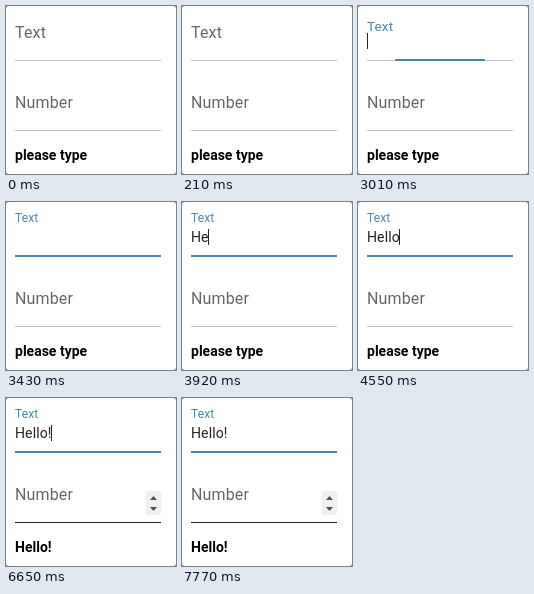
These frames come from a looping animation (170 px wide and 168 px high, 8000 ms). An HTML page with a canvas:

```html
<!DOCTYPE html>
<html lang="en">
<head>
<meta charset="utf-8">
<title>Form fields</title>
<style>
  html, body { margin: 0; width: 100%; height: 100%; overflow: hidden; background: #fff; }
  body { position: relative; font-family: Roboto, sans-serif; -webkit-font-smoothing: antialiased; }
  canvas { position: absolute; left: 0; top: 0; }
  .text { position: absolute; left: 9px; white-space: pre; letter-spacing: .00937em; }
  .label { font-size: 16px; line-height: 20px; color: rgba(0, 0, 0, .6); transform-origin: 0 0; }
  #typed { top: 23px; font-size: 14px; line-height: 24px; color: rgba(0, 0, 0, .87); }
  #result { top: 139px; font-size: 14px; line-height: 21px; font-weight: 700; letter-spacing: 0; color: #000; }
</style>
</head>
<body>
<canvas id="stage" width="170" height="168"></canvas>
<div class="text label" id="label" style="top:17px">Text</div>
<div class="text" id="typed"></div>
<div class="text label" style="top:87px">Number</div>
<div class="text" id="result">please type</div>
<script>
const LOOP = 8000, TICK = 70;
const FOCUS = 2850, FOCUS_TIME = 400;
const HOVER = 6440, HOVER_TIME = 280;
const BLUE = '#4a86ad';
const LEFT = 9, WIDTH = 146;
const WORD = 'Hello!';
const KEYS = [3710, 3920, 4130, 4340, 4550, 5180];
const BLINKS = [2870, 3430, 3710, 5040, 5180, 5740, 6230, 6720, 7280, 7770];

const $ = id => document.getElementById(id);
const label = $('label'), typed = $('typed'), result = $('result');
const ctx = $('stage').getContext('2d');
const clamp = x => Math.min(1, Math.max(0, x));
const countPast = (times, t) => times.filter(x => x <= t).length;

// cubic-bezier(.4, 0, .2, 1)
function ease(x) {
  let lo = 0, hi = 1;
  for (let i = 0; i < 24; i++) {
    const s = (lo + hi) / 2;
    const bx = 1.2 * s * (1 - s) ** 2 + .6 * s * s * (1 - s) + s ** 3;
    if (bx < x) lo = s; else hi = s;
  }
  return lo * lo * (3 - 2 * lo);
}

function rect(color, x, y, w, h) {
  ctx.fillStyle = color;
  ctx.fillRect(x, y, w, h);
}

function arrow(x, y, dir) {
  ctx.beginPath();
  ctx.moveTo(x - 3.5, y + 2 * dir);
  ctx.lineTo(x + 3.5, y + 2 * dir);
  ctx.lineTo(x, y - 2 * dir);
  ctx.fill();
}

function spinner() {
  ctx.fillStyle = '#efefef';
  ctx.beginPath();
  ctx.roundRect(140, 93, 15, 24, 2);
  ctx.fill();
  ctx.fillStyle = '#505050';
  arrow(147.5, 100, 1);
  arrow(147.5, 111, -1);
}

function background() {
  rect('#8a8a8a', 0, 0, 170, 168);
  ctx.fillStyle = '#fff';
  ctx.beginPath();
  ctx.roundRect(0, 0, 170, 168, 3);
  ctx.fill();
}

function draw(t) {
  const focus = ease(clamp((t - FOCUS) / FOCUS_TIME));
  const hover = ease(clamp((t - HOVER) / HOVER_TIME + .1));
  const hovered = t >= HOVER;

  label.style.color = focus > 0 ? BLUE : '';
  label.style.transform = `translateY(${-8 * focus}px) scale(${1 - .25 * focus})`;
  typed.textContent = WORD.slice(0, countPast(KEYS, t));
  result.textContent = hovered ? WORD : 'please type';

  background();
  rect('rgba(0,0,0,.24)', LEFT, 54, WIDTH, 1);
  rect(`rgba(0,0,0,${hovered ? .24 + .61 * hover : .24})`, LEFT, 124, WIDTH, 1);
  rect(BLUE, LEFT + WIDTH / 2 * (1 - focus), 53, WIDTH * focus, 2);
  if (hovered) spinner();
  if (countPast(BLINKS, t) % 2) {
    const end = LEFT + typed.getBoundingClientRect().width;
    rect('#222', Math.floor(end), 27, 1, 16);
  }
}

function frame(now) {
  const t = now % LOOP;
  draw(Math.floor(t / TICK) * TICK);
  requestAnimationFrame(frame);
}
draw(0);
requestAnimationFrame(frame);
</script>
</body>
</html>
```
